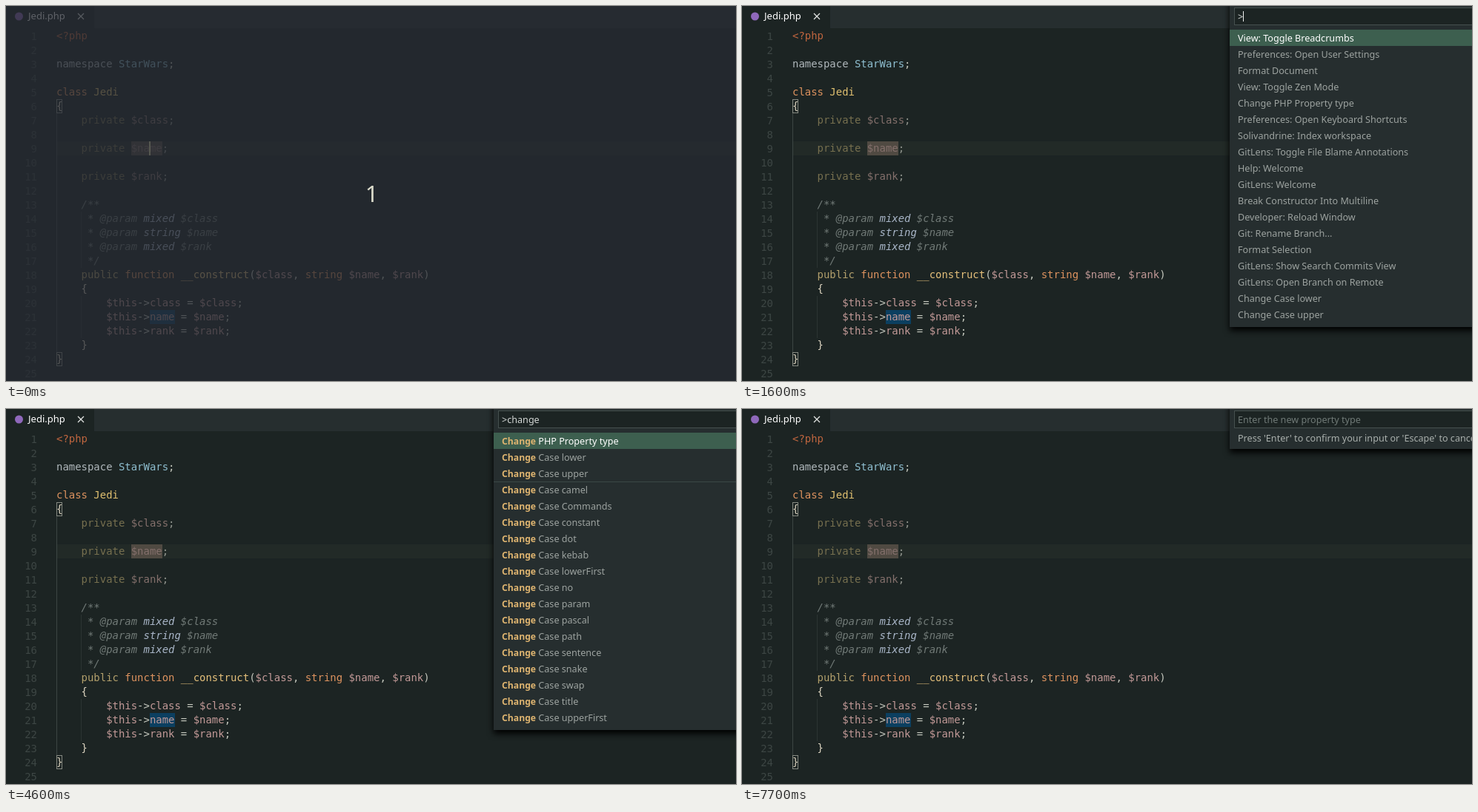
Animation of 985 by 507 pixels, one loop 8 s. Source, as an HTML page:

```html
<!DOCTYPE html>
<html lang="en">
<head>
<meta charset="utf-8">
<title>Command palette</title>
<style>
html, body { margin: 0; width: 100%; height: 100%; overflow: hidden; background: #1c2423; }
svg { display: block; width: 100%; height: 100%; }
text { white-space: pre; }
.code { font: 13.95px "DejaVu Sans Mono", monospace; }
.ui { font: 12.6px "Noto Sans", sans-serif; fill: #9da3a0; }
.hit { font-size: 12.2px; font-weight: 700; fill: #deb470; }
.shadow { filter: drop-shadow(0 5px 4px #000); }
</style>
</head>
<body>
<svg id="stage" viewBox="0 0 985 507"></svg>
<script>
const LOOP = 8000, CHAR = 8.4, LINE = 19, LEFT = 68, TOP = 31;
const EDITOR = '#1c2423', PANEL = '#262e2f';

const COLORS = {
  o: '#c0663f', n: '#b0b8bc', t: '#8fbfd0', k: '#de935f', y: '#e0c070',
  b: '#dcd4c0', d: '#77704f', v: '#84706c', p: '#92968f', c: '#717a77',
  m: '#a9b6c8', a: '#b3a06c', f: '#e5c07b', x: '#c39a98', w: '#c5c8be'
};

// Parts are split by "~"; the first letter of each part picks its colour.
const field = name => `d    private ~v$${name}~p;`;
const param = (type, name) => `c     * @param ~m${type}~c $${name}`;
const assign = name => `x        $this~w->~x${name}~w = ~x$${name}~w;`;
const CODE = [
  'o<?php', '', 'nnamespace ~tStarWars~w;', '', 'kclass ~yJedi', 'b{',
  field('class'), '', field('name'), '', field('rank'), '',
  'c    /**', param('mixed', 'class'), param('string', 'name'), param('mixed', 'rank'), 'c     */',
  'a    public ~kfunction ~f__construct~w(~x$class~w, ~kstring ~x$name~w, ~x$rank~w)',
  'b    {', assign('class'), assign('name'), assign('rank'), 'b    }', 'b}', ''
];

const WITH_C = [
  'View: Toggle Breadcrumbs', 'Preferences: Open User Settings', 'Format Document',
  'Change PHP Property type', 'Preferences: Open Keyboard Shortcuts',
  'Solivandrine: Index workspace', 'Help: Welcome', 'GitLens: Welcome',
  'Break Constructor Into Multiline', 'Git: Rename Branch...', 'Format Selection',
  'GitLens: Show Search Commits View', 'GitLens: Open Branch on Remote',
  'Change Case lower', 'Change Case upper', 'View: Quick Open View',
  'Convert Indentation to Tabs', 'Convert Indentation to Spaces'
];
const RECENT = [
  ...WITH_C.slice(0, 3), 'View: Toggle Zen Mode', ...WITH_C.slice(3, 6),
  'GitLens: Toggle File Blame Annotations', ...WITH_C.slice(6, 9),
  'Developer: Reload Window', ...WITH_C.slice(9, 15)
];
const CHANGE = ['Change PHP Property type', ...(
  'lower upper camel Commands constant dot kebab lowerFirst no param ' +
  'pascal path sentence snake swap title upperFirst'
).split(' ').map(s => 'Change Case ' + s)];

const PALETTE = [
  { at: 1600, typed: '', query: '', list: RECENT },
  { at: 2200, typed: 'c', query: '', list: RECENT },
  { at: 2300, typed: 'c', query: 'c', list: WITH_C },
  { at: 2500, typed: 'cha', query: 'cha', list: CHANGE },
  { at: 2600, typed: 'chan', query: 'chan', list: CHANGE },
  { at: 2800, typed: 'chang', query: 'chang', list: CHANGE },
  { at: 3000, typed: 'change', query: 'change', list: CHANGE }
];
const PROMPT_AT = 4700;

const esc = s => s.replace(/&/g, '&amp;').replace(/</g, '&lt;').replace(/>/g, '&gt;');
const rect = (x, y, w, h, fill, more = '') =>
  `<rect x="${x}" y="${y}" width="${w}" height="${h}" fill="${fill}" ${more}/>`;
const label = (x, y, body, more = '') => `<text class="ui" x="${x}" y="${y}" ${more}>${body}</text>`;
const lineTop = n => TOP + (n - 1) * LINE;
const colX = n => LEFT + n * CHAR;

function codeLine(line, i) {
  const y = lineTop(i + 1) + 14;
  const spans = line.split('~').filter(Boolean).map(part => {
    const italic = 'cm'.includes(part[0]) ? ' font-style="italic"' : '';
    return `<tspan fill="${COLORS[part[0]]}"${italic}>${esc(part.slice(1))}</tspan>`;
  }).join('');
  return `<text class="code" x="42" y="${y + 1}" text-anchor="end" fill="#3d4644">${i + 1}</text>` +
    `<text class="code" x="${LEFT}" y="${y}">${spans}</text>`;
}

function editor() {
  const guide = (col, from, to, fill) =>
    rect(Math.floor(colX(col)), lineTop(from), 1, (to - from + 1) * LINE, fill);
  const bracket = n => rect(68.5, lineTop(n) + .5, 7, LINE - 1, 'none', 'stroke="#868a82"');
  return rect(0, 0, 985, 507, EDITOR) +
    rect(0, 0, 985, 30, PANEL) + rect(0, 0, 119, 31, EDITOR) +
    '<circle cx="17.5" cy="14" r="5.5" fill="#8f68bb"/>' +
    label(30, 18, 'Jedi.php', 'style="font-size:13px;fill:#fff"') +
    '<path d="M97 10l8 8m0-8l-8 8" stroke="#e4e6e5" stroke-width="1.2"/>' +
    rect(LEFT, lineTop(9), 985 - LEFT, LINE, '#222a27') +
    rect(169, lineTop(9), 42, LINE, '#504a42') +
    rect(194, lineTop(21), 34, LINE, '#0b3f60') +
    guide(0, 7, 23, '#3d4644') + guide(4, 14, 17, '#2b3432') + guide(4, 20, 22, '#2b3432') +
    bracket(6) + bracket(24) +
    CODE.map(codeLine).join('');
}

// Prefer a match at the start of a word, otherwise take the first one.
function mark(name, query) {
  if (!query) return esc(name);
  let at = name.search(new RegExp('\\b' + query, 'i'));
  if (at < 0) at = name.toLowerCase().indexOf(query);
  const end = at + query.length;
  return esc(name.slice(0, at)) +
    `<tspan class="hit">${name.slice(at, end)}</tspan>` + esc(name.slice(end));
}

const frame = height =>
  rect(658, -10, 340, height + 10, PANEL, 'class="shadow"') +
  rect(664.5, 2.5, 340, 23, EDITOR, 'stroke="#46514f"');

function palette({ typed, query, list }) {
  const rows = list.map((name, i) =>
    label(669, 48 + 22 * i, mark(name, query), i ? '' : 'style="fill:#fff"')).join('');
  return frame(434) +
    rect(658, 32, 327, 22, '#3d5f4f') +
    (list === CHANGE ? rect(658, 98, 327, 1, '#3b4846') : '') +
    label(669, 18.5, '&gt;' + typed, 'id="typed" style="fill:#d4d8d6"') + rows;
}

const prompt = () => frame(54) +
  label(669, 18.5, 'Enter the new property type', 'style="fill:#707a77"') +
  label(669, 44, "Press 'Enter' to confirm your input or 'Escape' to cancel", 'style="fill:#a9afac"');

const stage = document.getElementById('stage');
stage.innerHTML = editor() +
  rect(193, lineTop(9), 2, LINE, '#e2dfa8', 'id="cursor"') +
  '<g id="panel"></g>' + rect(669, 7, 1, 14, '#f0f2f1', 'id="caret"') +
  '<g id="cover">' + rect(0, 0, 985, 507, '#262b32', 'opacity=".74"') +
  '<text x="493.5" y="265" text-anchor="middle" fill="#dcdccc" font-size="31" ' +
  'font-family="Noto Sans, sans-serif">1</text></g>';

const [cursor, panel, caret, cover] =
  ['cursor', 'panel', 'caret', 'cover'].map(id => document.getElementById(id));
const show = (el, on) => el.setAttribute('visibility', on ? 'visible' : 'hidden');
const within = (t, from, to) => t >= from && t < to;

let shown = null;
function setPanel(state) {
  if (state === shown) return;
  shown = state;
  panel.innerHTML = !state ? '' : state === 'prompt' ? prompt() : palette(state);
  const typed = document.getElementById('typed');
  caret.setAttribute('x', 669 + (typed ? Math.floor(typed.getComputedTextLength()) : 0));
}

function draw(t) {
  show(cover, t < 100);
  show(cursor, t < 500 || within(t, 900, 1400));
  setPanel(t >= PROMPT_AT ? 'prompt' : PALETTE.filter(s => t >= s.at).pop() || null);
  show(caret, t >= PROMPT_AT
    ? Math.floor((t - PROMPT_AT) / 600) % 2 === 0
    : within(t, 1600, 3500) || within(t, 4400, 4600));
}

const start = performance.now();
function tick() {
  draw((performance.now() - start) % LOOP);
  requestAnimationFrame(tick);
}
tick();
</script>
</body>
</html>
```
